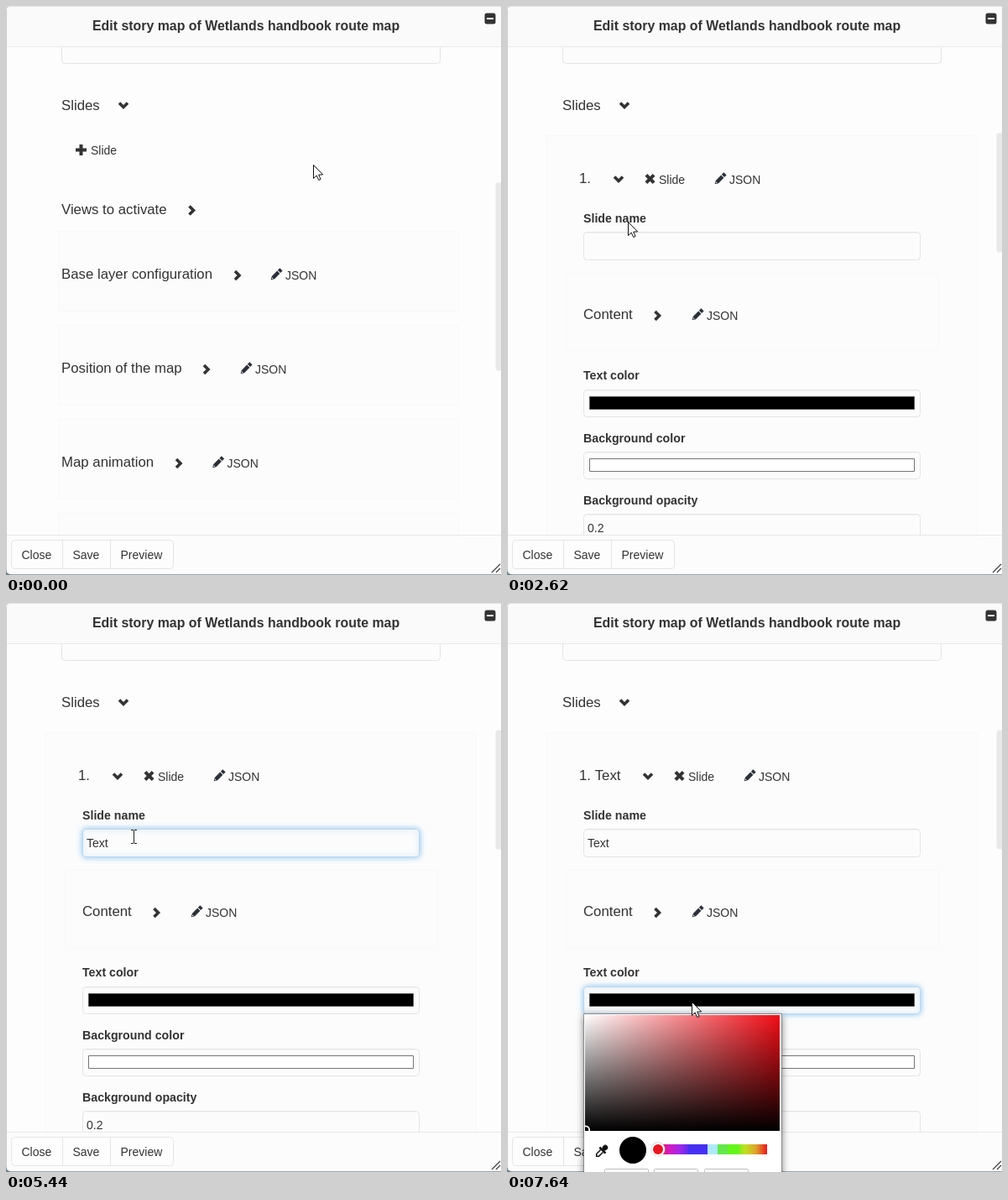
These frames come from a looping animation (590 by 678 pixels, 8 s). An HTML page with a canvas:

```html
<!DOCTYPE html>
<html lang="en">
<head>
<meta charset="utf-8">
<title>Slide editor</title>
<style>
  html, body { margin: 0; width: 100%; height: 100%; overflow: hidden; background: #fdfdfd; }
  canvas { display: block; width: 590px; height: 678px; }
</style>
</head>
<body>
<canvas id="stage" width="590" height="678"></canvas>
<script>
const ctx = document.getElementById('stage').getContext('2d');
const LOOP = 8000;
const FONT = '"Liberation Sans", Arial, sans-serif';
const INK = '#333';

// Pointer moves: start, end, destination x, y
const START = [366, 189];
const MOVES = [
  [0, 1000, 119, 171],
  [1600, 2420, 141, 250],
  [2420, 3020, 152, 277],
  [5240, 5440, 152, 278],
  [5440, 6040, 207, 414],
  [6440, 7040, 220, 475]
];
const CLICKS = [1400, 3220, 6240, 7240];

function tickOf(t) {
  if (t < 1820) return Math.min(1600, Math.floor(t / 200) * 200);
  const offset = t < 5440 ? 20 : 40;
  return Math.floor((t - offset) / 200) * 200 + offset;
}

const ease = p => p * p * (3 - 2 * p);

function pointerAt(t) {
  let [x, y] = START;
  for (const [t0, t1, tx, ty] of MOVES) {
    const k = ease(Math.min(1, Math.max(0, (t - t0) / (t1 - t0))));
    x += (tx - x) * k;
    y += (ty - y) * k;
  }
  return [Math.round(x), Math.round(y)];
}

function text(s, x, y, size = 14, weight = 'normal', color = INK) {
  ctx.font = `${weight} ${size}px ${FONT}`;
  ctx.fillStyle = color;
  ctx.fillText(s, x, y);
}
const heading = (s, x, y) => text(s, x, y, 16.8);
const label = (s, x, y) => text(s, x, y, 14.2, 'bold');

function rect(x, y, w, h, color) {
  ctx.fillStyle = color;
  ctx.fillRect(x, y, w, h);
}

function box(x, y, w, h, fill, stroke, radius = 4) {
  ctx.beginPath();
  ctx.roundRect(x + .5, y + .5, w - 1, h - 1, radius);
  if (fill) { ctx.fillStyle = fill; ctx.fill(); }
  if (stroke) { ctx.strokeStyle = stroke; ctx.lineWidth = 1; ctx.stroke(); }
}

function line(points, color = INK, width = 1) {
  ctx.beginPath();
  points.forEach(([x, y]) => ctx.lineTo(x, y));
  ctx.strokeStyle = color;
  ctx.lineWidth = width;
  ctx.stroke();
}

function shape(points, color) {
  ctx.beginPath();
  points.forEach(([x, y]) => ctx.lineTo(x, y));
  ctx.closePath();
  ctx.fillStyle = color;
  ctx.fill();
}

function disc(x, y, r, color) {
  ctx.beginPath();
  ctx.arc(x, y, r, 0, 7);
  ctx.fillStyle = color;
  ctx.fill();
}

function at(x, y, angle, draw) {
  ctx.save();
  ctx.translate(x, y);
  ctx.rotate(angle);
  draw();
  ctx.restore();
}

function chevron(x, y, down) {
  at(x, y, down ? Math.PI / 2 : 0, () => line([[-3, -5], [2, 0], [-3, 5]], INK, 3.6));
}

function cross(x, y, angle, color = INK) {
  at(x, y, angle, () => {
    rect(-6.5, -2, 13, 4, color);
    rect(-2, -6.5, 4, 13, color);
  });
}

function pencil(x, y) {
  at(x, y, -Math.PI / 4, () => {
    shape([[-9, 0], [-5, -2.3], [4, -2.3], [4, 2.3], [-5, 2.3]], '#2b3038');
    rect(5, -2.3, 3.5, 4.6, '#2b3038');
    rect(-7, -.5, 1.5, 1, '#fdfdfd');
  });
}

function jsonButton(x, y) {
  pencil(x, y);
  text('JSON', x + 11, y + 6);
}

function panel(x, y, w, h) {
  box(x, y, w, h, '#fcfcfc', '#f8f8f8', 2);
}

function input(x, y, w, h, glow = 0) {
  ctx.save();
  if (glow) {
    ctx.shadowColor = `rgba(102,175,233,${.75 * glow})`;
    ctx.shadowBlur = 7;
  }
  box(x, y, w, h, '#fcfcfc', glow > .5 ? '#b9d8f0' : '#e4e4e4');
  ctx.restore();
  line([[x + 3, y + 1.5], [x + w - 3, y + 1.5]], '#f3f3f3');
}

function thumb(y, h) {
  box(583, y, 10, h, '#e9e9e9', null, 3);
}

function listView(hover) {
  cross(89.5, 171.5, 0, hover ? '#1c1c1c' : INK);
  text('Slide', 101, 177, 14, 'normal', hover ? '#1c1c1c' : INK);
  heading('Views to activate', 66, 248);
  chevron(221.5, 243.5);
  const rows = [
    ['Base layer configuration', 276, 322],
    ['Position of the map', 239, 286],
    ['Map animation', 206, 252.5]
  ];
  rows.forEach(([name, arrowX, penX], i) => {
    const y = 268 + 112 * i;
    panel(62, y, 478, 96);
    heading(name, 66, y + 57);
    chevron(arrowX, y + 53);
    jsonButton(penX, y + 52);
  });
  panel(62, 604, 478, 96);
  thumb(210, 225);
}

function slideView(t) {
  const typed = 'Text'.slice(0, t < 4220 ? 0 : Math.floor((t - 4220) / 200) + 1);
  const renamed = t >= 6240;
  const shift = renamed ? 35 : 0;
  const nameGlow = t < 3220 || t >= 6440 ? 0 : t < 3420 || t >= 6240 ? .15 : 1;
  const colorGlow = t < 7440 ? 0 : t < 7640 ? .4 : 1;

  panel(46, 154, 515, 540);
  panel(70, 318, 445, 93);
  heading('1.' + (renamed ? ' Text' : ''), 86, 211);
  chevron(133 + shift, 206.5, true);
  cross(170.5 + shift, 206, Math.PI / 4);
  text('Slide', 181 + shift, 212);
  jsonButton(254 + shift, 206);

  label('Slide name', 91, 258);
  input(91, 269, 402, 34, nameGlow);
  text(typed, 96, 291);
  if (t >= 3220 && t < 3820) rect(96, 278, 1, 16, '#111');

  heading('Content', 91, 373);
  chevron(179.5, 369);
  jsonButton(227, 368);

  label('Text color', 91, 445);
  input(91, 457, 402, 33, colorGlow);
  box(98, 465, 388, 16, '#000', '#555', 0);
  label('Background color', 91, 520);
  input(91, 531, 402, 33);
  box(98, 539, 388, 16, '#fff', '#757575', 0);
  label('Background opacity', 91, 594);
  input(91, 605, 402, 34);
  text('0.2', 96, 627);
  thumb(151, 143);
}

function chrome() {
  rect(0, 0, 590, 48, '#fafafa');
  rect(0, 48, 590, 1, '#eaeaea');
  rect(0, 0, 590, 1, '#e6e6e6');
  text('Edit story map of Wetlands handbook route map', 103, 29, 15.9, 'bold');
  box(570, 8, 14, 14, INK, null, 2.5);
  rect(573, 14, 8, 2, '#fff');

  rect(0, 630, 590, 48, '#fcfcfc');
  rect(0, 630, 590, 1, '#e8e8e8');
  box(6, 636, 194, 35, '#fdfdfd', '#e5e5e5');
  rect(67, 637, 1, 33, '#e5e5e5');
  rect(124, 637, 1, 33, '#e5e5e5');
  text('Close', 18.5, 659);
  text('Save', 79.5, 659);
  text('Preview', 136.5, 659);
  for (const d of [0, 5]) line([[579 + d, 675], [589, 665 + d]], '#444', 1.3);

  rect(0, 4, 1, 670, '#c9cdd0');
  rect(4, 677, 586, 1, '#9aa5ac');
  shape([[0, 672], [1.5, 675.5], [6, 678], [0, 678]], '#71838d');
  shape([[0, 0], [4, 0], [0, 4]], '#d5d8da');
}

function popupShadow(alpha) {
  ctx.save();
  ctx.beginPath();
  ctx.rect(0, 0, 590, 678);
  ctx.rect(92, 490, 235, 200);
  ctx.clip('evenodd');
  ctx.shadowColor = `rgba(0,0,0,${alpha})`;
  ctx.shadowBlur = 9;
  ctx.shadowOffsetY = 2;
  rect(92, 490, 235, 200, '#999');
  ctx.restore();
  line([[91.5, 678], [91.5, 489.5], [327.5, 489.5], [327.5, 678]], `rgba(110,110,110,${alpha})`);
}

function gradient(x0, y0, x1, y1, colors) {
  const g = ctx.createLinearGradient(x0, y0, x1, y1);
  colors.forEach((c, i) => g.addColorStop(i / (colors.length - 1), c));
  return g;
}

function dropper(x, y) {
  at(x, y, -Math.PI / 4, () => {
    box(1.5, -3.5, 8, 7, '#111', null, 3);
    rect(0, -5, 2.5, 10, '#111');
    ctx.beginPath();
    ctx.moveTo(0, -2); ctx.lineTo(-7, -2); ctx.lineTo(-9, 0);
    ctx.lineTo(-7, 2); ctx.lineTo(0, 2);
    ctx.strokeStyle = '#111';
    ctx.lineWidth = 1.5;
    ctx.stroke();
  });
}

function colorPicker() {
  popupShadow(.6);
  rect(92, 490, 235, 188, '#fff');
  rect(93, 491, 232, 138, gradient(93, 0, 325, 0, ['#fff', '#f20d16']));
  rect(93, 491, 232, 138, gradient(0, 491, 0, 629, ['rgba(0,0,0,0)', '#000']));
  ctx.save();
  ctx.beginPath();
  ctx.rect(93, 491, 232, 138);
  ctx.clip();
  disc(93.5, 628, 5.5, '#fff');
  disc(93.5, 628, 3.7, '#000');
  ctx.restore();

  dropper(113, 653);
  disc(150, 652, 16, '#000');
  rect(180, 645, 130, 12, gradient(180, 0, 310, 0, [
    '#e8141f', '#d51bc0', '#a226e8', '#4a2df0', '#4035f0', '#aeeaf5',
    '#62ea48', '#5ef020', '#c0e020', '#e0a02c', '#e8141f']));
  // solid bands where the strip reads as blocks
  rect(216, 645, 23, 12, '#4630f2');
  rect(239, 645, 12, 12, '#adeaf5');
  rect(251, 645, 12, 12, '#62e84c');
  rect(263, 645, 14, 12, '#64f41c');
  disc(180, 651, 8.5, '#bbb');
  disc(180, 651, 8, '#fff');
  disc(180, 651, 6, '#e8141f');
  for (const x of [116, 175, 235]) box(x, 674, 53, 20, '#fff', '#bdbdbd', 1);
}

function arrow(x, y) {
  ctx.save();
  ctx.translate(x + .5, y + .5);
  ctx.beginPath();
  [[0, 0], [0, 16], [3.7, 12.5], [6.2, 18], [8.6, 17], [6.2, 11.6], [11.2, 11.4]]
    .forEach(([px, py]) => ctx.lineTo(px, py));
  ctx.closePath();
  ctx.fillStyle = '#fff';
  ctx.fill();
  ctx.strokeStyle = '#111';
  ctx.lineWidth = 1;
  ctx.stroke();
  ctx.restore();
}

function beam(x, y) {
  rect(x, y - 7, 1, 15, '#222');
  for (const dy of [-8, 8]) {
    rect(x - 3, y + dy, 3, 1, '#222');
    rect(x + 1, y + dy, 3, 1, '#222');
  }
}

function pointer(t) {
  const [x, y] = pointerAt(t);
  if (CLICKS.includes(t)) {
    ctx.globalCompositeOperation = 'multiply';
    disc(x - 1, y - 1, 15, '#fffb4a');
    ctx.globalCompositeOperation = 'source-over';
  }
  const overName = t >= 2620 && y >= 268 && y < 303;
  (overName ? beam : arrow)(x, y);
}

function render(time) {
  const t = tickOf(time);
  rect(0, 0, 590, 678, '#fdfdfd');
  input(66, 30, 452, 39);
  heading('Slides', 66, 124);
  chevron(140, 118.5, true);
  if (t < 1600) listView(t >= 800);
  else slideView(t);
  chrome();
  if (t >= 7640) {
    colorPicker();
  } else if (t >= 7440) {
    popupShadow(.5);
    label('Background opacity', 91, 594);
  }
  pointer(t);
}

const begin = performance.now();
function loop() {
  render((performance.now() - begin) % LOOP);
  requestAnimationFrame(loop);
}
loop();
</script>
</body>
</html>
```
